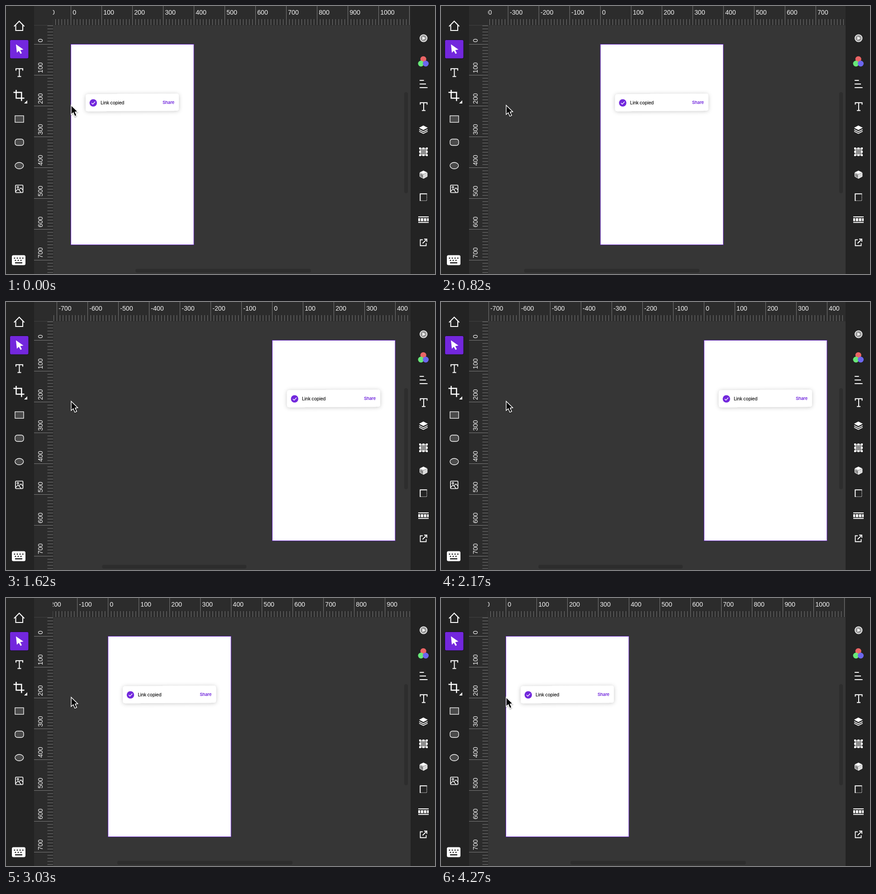
Animation, 948 px wide and 591 px high, one loop 4310 ms. Source, as an HTML page:

```html
<!DOCTYPE html>
<html lang="en">
<head>
<meta charset="utf-8">
<title>Canvas panning</title>
<style>
html, body { margin: 0; width: 100%; height: 100%; overflow: hidden; background: #363636; }
svg { display: block; }
text { font: 14.2px "Liberation Sans", Arial, sans-serif; fill: #f2f2f2; }
.toast text { font: 500 10px Inter, sans-serif; letter-spacing: -.25px; fill: #111; }
.toast .action { font-weight: 600; font-size: 9.6px; letter-spacing: -.15px; fill: #7228dd; }
.ticks { stroke: #7c7c7c; fill: none; }
.line { fill: none; stroke: #fff; stroke-width: 2; }
.shape { fill: #4a4a4a; stroke: #fff; stroke-width: 1.3; }
.bar { fill: #2d2d2d; }
.panel { fill: #232323; }
</style>
</head>
<body>
<svg width="948" height="591" viewBox="0 0 948 591">
  <defs>
    <clipPath id="topClip"><path d="M103.5 0H893V43H103.5Z"/></clipPath>
    <clipPath id="sideClip"><path d="M62 43H105V591H62Z"/></clipPath>
    <filter id="soft" x="-20%" y="-80%" width="140%" height="260%">
      <feDropShadow dx="0" dy="1" stdDeviation="5" flood-opacity=".22"/>
    </filter>
    <filter id="small" x="-50%" y="-50%" width="200%" height="200%">
      <feDropShadow dx="0" dy="1.5" stdDeviation="1.2" flood-opacity=".4"/>
    </filter>
  </defs>

  <rect width="948" height="591" fill="#363636"/>
  <rect class="bar" x="880" y="190" width="8" height="223" rx="4"/>
  <rect class="bar" id="scroll" y="579.5" height="8.5" rx="4"/>

  <g id="page">
    <rect x=".5" y="84.5" width="271.5" height="442" fill="#fff" stroke="#7431d6"/>
    <g class="toast">
      <path d="M38.5 194.4L233.5 193.2Q239 193.2 239 198.5V225.5Q239 231 233.5 231L38.5 232.2Q33 232.2 33 227V200Q33 194.4 38.5 194.4Z" fill="#fff" filter="url(#soft)"/>
      <circle cx="49.8" cy="213.6" r="8.2" fill="#7228dd"/>
      <path d="M46 213.8L48.8 216.5L54 211" fill="none" stroke="#fff" stroke-width="1.4"/>
      <text x="66" y="217">Link copied</text>
      <text class="action" x="203" y="216">Share</text>
    </g>
  </g>

  <path d="M62 0H894V42.5H104.5V591H62Z" fill="#2c2c2c"/>
  <path d="M62 42.5H104" stroke="#414141"/>
  <g clip-path="url(#topClip)"><g id="top"></g></g>
  <g clip-path="url(#sideClip)"><g id="side"></g></g>

  <path class="panel" d="M0 0H62V591H0ZM894 0H948V591H894Z"/>

  <g id="leftTools">
    <path class="line" d="M17.8 45L29.2 33.5L40.5 45M21.5 42V54H37V42"/>
    <rect x="8.5" y="74.5" width="41.5" height="41.5" rx="3" fill="#7327dd" stroke="#15101c"/>
    <path d="M22 84.5L24 103L28.3 98.8L32 105.5L35 104L31.5 97.3L38.5 96Z" fill="#fff"/>
    <path id="tee" class="line" d="M22 142.5V138.3H37V142.5M29.5 138V155.5M25.5 155.5H33.5"/>
    <path class="line" style="stroke-width:2.5" d="M16.5 190.5H34.3V209.5M22.5 185V203.3H40.5"/>
    <path d="M47 208V215H40Z" fill="#fff"/>
    <rect class="shape" x="20" y="242" width="19" height="14.5"/>
    <rect class="shape" x="20" y="293.5" width="19" height="14" rx="5"/>
    <ellipse class="shape" cx="29.3" cy="352" rx="9.4" ry="7"/>
    <rect class="line" style="stroke-width:1.7" x="21" y="395" width="16.5" height="16.5" rx="1.5"/>
    <path class="line" style="stroke-width:1.5" d="M21.5 409L26.5 403.5L33.5 411M28.5 405.5L33 401L37 405.5"/>
    <circle class="line" style="stroke-width:1.4" cx="26.3" cy="399.6" r="1.8"/>
    <rect x="13" y="549.5" width="30" height="22" rx="3.5" fill="#fff"/>
    <path d="M17.5 556H39M19.5 561H37" stroke="#222" stroke-width="2.6" stroke-dasharray="2.8 3.3"/>
    <path d="M20 566.3H36" stroke="#222" stroke-width="2.6"/>
  </g>

  <g id="rightTools">
    <circle cx="922.7" cy="71" r="7.8" fill="#969696" stroke="#fff" stroke-width="1.6"/>
    <path d="M920.3 67.3L927 71L920.3 74.7Z" fill="#fff"/>
    <circle cx="922.2" cy="117.2" r="6.5" fill="#ea6565"/>
    <circle cx="917" cy="127" r="6.5" fill="#68e878"/>
    <circle cx="927.5" cy="127" r="6.5" fill="#6c66ee"/>
    <path class="line" d="M914 164H923.5M914 172H928M914 180H931.5"/>
    <use href="#tee" transform="translate(893.5 75)"/>
    <path d="M922.3 263.5L932 268.5L922.3 273.5L912.8 268.5Z" fill="#fff"/>
    <path class="line" style="stroke-width:1.8" d="M913 272.5L922.3 277.2L931.7 272.5M913 276.2L922.3 281L931.7 276.2"/>
    <rect x="915" y="314" width="15" height="15" fill="#8f8f8f" stroke="#fff"/>
    <path id="handles" fill="#fff"/>
    <path d="M922.5 363L931 367L922.5 371L914 367Z" fill="#fff"/>
    <path d="M914.5 368V376L922.5 380.3V372Z" fill="#8a8a8a" stroke="#fff"/>
    <path d="M930.8 368V376L922.8 380.3V372Z" fill="#d8d8d8" stroke="#fff"/>
    <path class="line" d="M915.3 430V414.3H930.5"/>
    <path class="line" style="stroke-width:1.3" stroke-dasharray="1.3 1.5" d="M929.8 416V429.3H916"/>
    <path class="line" d="M911 465H934M911 477.3H934"/>
    <path d="M911 468H915V474.5H911ZM916.5 468H922V474.5H916.5ZM923.5 468H929V474.5H923.5ZM930.5 468H934V474.5H930.5Z" fill="#fff"/>
    <path class="line" style="stroke-width:1.8" d="M921 515.5H915.5V528.5H928.5V523M924 514H930V520M930 514L920.5 523.5"/>
  </g>

  <path d="M144 219V239.3L148.6 235.2L152.2 243.2L156.2 241.5L152.7 233.7L158.6 233.2Z" fill="#000" stroke="#fff" stroke-width="1.4" filter="url(#small)"/>
</svg>
<script>
const STEP = 6.8, LOOP = 4310, VIEW_LEFT = 104, VIEW_WIDTH = 790;
const el = id => document.getElementById(id);

// Ruler marks: one minor tick per 10 units, a long tick and label per 100.
function ruler(from, to, tick, label) {
  let d = "", labels = "";
  for (let i = from; i <= to; i++) {
    const major = i % 10 === 0;
    d += tick(i * STEP, major);
    if (major) labels += `<text ${label(i * STEP)}>${i * 10}</text>`;
  }
  return `<path class="ticks" d="${d}"/>${labels}`;
}

el("top").innerHTML = ruler(-90, 120,
  (p, major) => `M${p + .5} ${major ? 0 : 29}V42`,
  p => `x="${p + 4.2}" y="19"`);
el("side").innerHTML = ruler(-7, 80,
  (p, major) => `M${major ? 62 : 91.5} ${p + 84.5}H104`,
  p => `transform="translate(81 ${p + 80}) rotate(-90)"`);

let handles = "";
for (const x of [915, 922.5, 930])
  for (const y of [314, 321.5, 329])
    if (x !== 922.5 || y !== 321.5) handles += `M${x - 2} ${y - 2}h4v4h-4Z`;
el("handles").setAttribute("d", handles);

// Pan keys: time, page position, speed in px/ms.
const keys = [
  [0, 143, 0], [520, 251, .33], [1170, 467, .32], [1800, 603, 0],
  [2170, 581, -.12], [2720, 358.5, -.49], [3330, 160, -.07], [3800, 143, 0]
];

function pan(t) {
  const i = keys.findIndex(k => k[0] > t);
  if (i < 0) return 143;
  const [t0, x0, v0] = keys[i - 1], [t1, x1, v1] = keys[i];
  const h = t1 - t0, u = (t - t0) / h, w = 1 - u;
  return w * w * ((1 + 2 * u) * x0 + u * h * v0) + u * u * ((3 - 2 * u) * x1 - w * h * v1);
}

function draw(now) {
  const x = pan(now % LOOP);
  for (const id of ["page", "top"]) el(id).setAttribute("transform", `translate(${x.toFixed(2)} 0)`);

  // The scrollable area grows leftwards once the page is far to the right.
  const wide = x > 410;
  const ratio = VIEW_WIDTH / (wide ? 1956 : 1610);
  const offset = VIEW_LEFT + (wide ? 752 : 410) - x;
  el("scroll").setAttribute("x", VIEW_LEFT + offset * ratio);
  el("scroll").setAttribute("width", VIEW_WIDTH * ratio);
  requestAnimationFrame(() => draw(performance.now() - start));
}

const start = performance.now();
draw(0);
</script>
</body>
</html>
```
